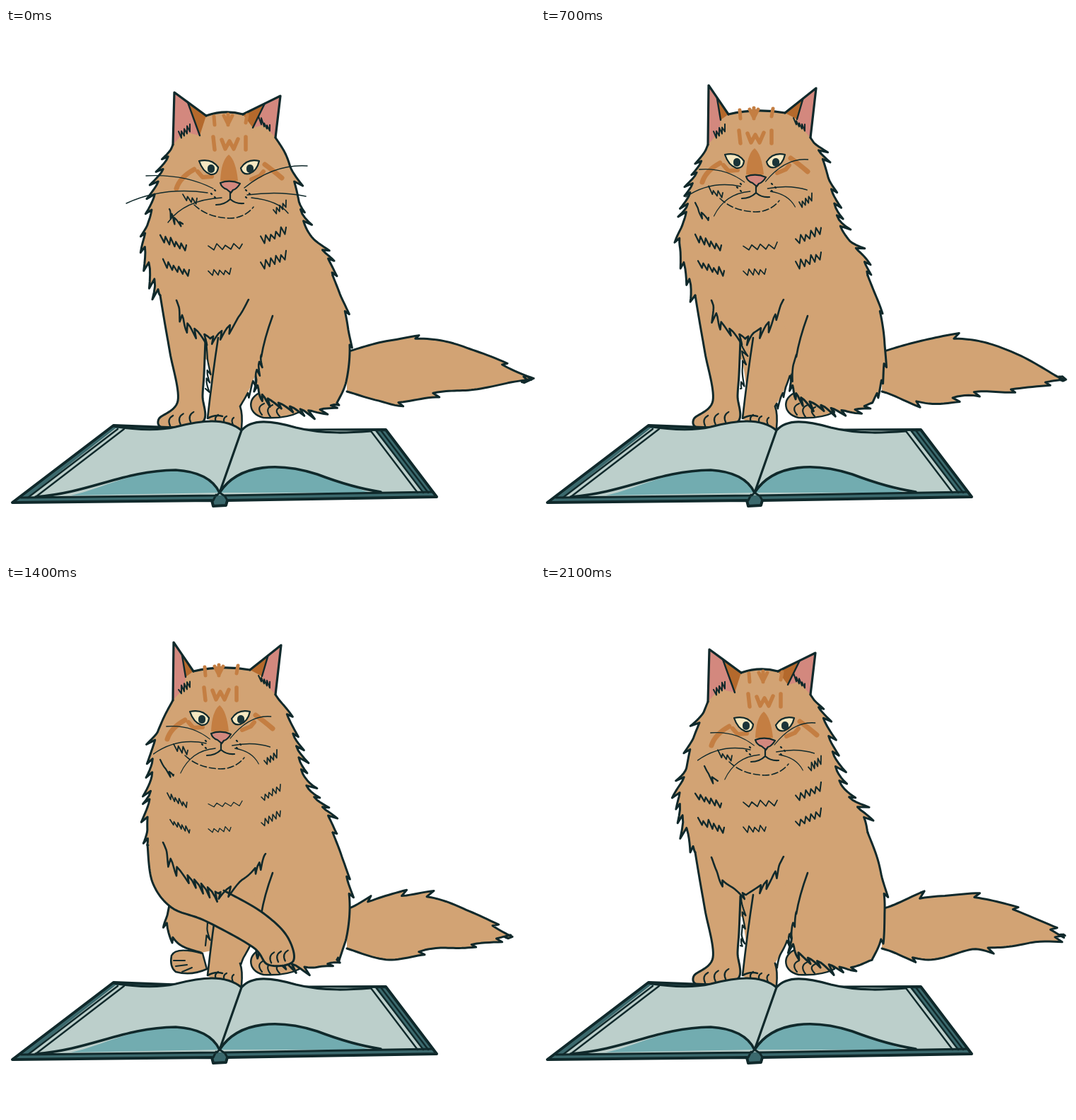
An HTML page with a canvas that plays this animation: 748x748 px, repeating every 2.24 s.

```html
<!DOCTYPE html>
<html lang="en">
<head>
<meta charset="utf-8">
<title>Cat and book</title>
<style>
html, body { margin: 0; width: 100%; height: 100%; overflow: hidden; background: #fff; }
canvas { display: block; width: 100vw; height: 100vh; }
</style>
</head>
<body>
<canvas id="stage" width="748" height="748"></canvas>
<script>
const ctx = document.getElementById('stage').getContext('2d');
const STEP = 140, STEPS = 16;
const INK = '#10292b', FUR = '#d2a374', PINK = '#d3887e', RUST = '#b4692c', STRIPE = '#c47e42';
const PAGE = '#bccfcb', TEAL = '#72acb0', COVER = '#3b696d', CREAM = '#f6e8c2';

// Key shapes, blended by the pose weights.
const TAIL = {
  straight: [[482, 486], [545, 486], [610, 478], [670, 486], [735, 496]],
  down: [[482, 485], [532, 468], [580, 461], [620, 485], [635, 533]],
  up: [[482, 487], [545, 497], [602, 470], [628, 435], [635, 393]]
};
const FLANK = {
  rest: [[236, 165], [226, 190], [213, 224], [205, 262], [196, 307], [218, 378]],
  raised: [[236, 163], [221, 192], [209, 227], [206, 278], [200, 330], [201, 368]]
};
const BACK = {
  rest: [[381, 155], [397, 182], [410, 226], [424, 282], [454, 323], [462, 350]],
  hunched: [[386, 150], [398, 190], [418, 235], [440, 280], [449, 322], [462, 350]]
};
const LEG = {
  rest: [[218, 378], [225, 420], [232, 460], [243, 527], [216, 553], [226, 566], [278, 557], [278, 520], [280, 490], [282, 440]],
  raised: [[200, 368], [207, 420], [234, 456], [282, 475], [349, 512], [371, 537], [406, 532], [397, 496], [361, 462], [308, 432]]
};
const CHEST = {
  rest: [[241, 385], [256, 417], [290, 438], [325, 413], [343, 384]],
  raised: [[222, 364], [243, 400], [300, 436], [342, 411], [367, 380]]
};
// Tip, base and inner fold end of each ear, facing the reader or the book.
const EARS = {
  down: [[[238, 91], [283, 124], [274, 152]], [[388, 96], [335, 122], [349, 141]]],
  ahead: [[[237, 81], [265, 122], [254, 130]], [[389, 85], [345, 120], [362, 129]]]
};

const mix = (a, b, t) => Array.isArray(a) ? a.map((v, i) => mix(v, b[i], t)) : a + (b - a) * t;
const ramp = (x, from, to) => {
  const t = Math.min(1, Math.max(0, (x - from) / (to - from)));
  return t * t * (3 - 2 * t);
};

function poseAt(step) {
  const back = 1 - ramp(step, 12, 15);
  return {
    step,
    curlDown: ramp(step, 0, 2) - ramp(step, 2, 4),
    curlUp: ramp(step, 2, 4) - ramp(step, 4, 5),
    tuck: ramp(step, 7, 8) - ramp(step, 11, 12),
    turn: ramp(step, 3, 5) ** 2 * back,
    lift: ramp(step, 7, 10) * back,
    hunch: ramp(step, 10, 11) - ramp(step, 12, 14),
    perk: step === 14 ? 1 : 0,
    raised: step > 7 && step < 15,
    whiskers: 1 - .35 * ramp(step, 0, 6)
  };
}

// Catmull-Rom curve through the points, sampled.
function curve(pts, n = 14) {
  const out = [];
  for (let i = 0; i < pts.length - 1; i++) {
    const b = pts[i], c = pts[i + 1], a = pts[i - 1] || b, d = pts[i + 2] || c;
    const at = (t, j) => {
      const slope = c[j] - a[j];
      const square = 2 * a[j] - 5 * b[j] + 4 * c[j] - d[j];
      const cube = 3 * (b[j] - c[j]) + d[j] - a[j];
      return b[j] + .5 * t * (slope + t * (square + t * cube));
    };
    for (let k = 0; k < n; k++) out.push([at(k / n, 0), at(k / n, 1)]);
  }
  return [...out, pts[pts.length - 1]];
}

let seed = 1;
const random = () => (seed = seed * 16807 % 2147483647) / 2147483647;

// Curve with tufts pointing along it; the sign of height picks the side.
function fur(pts, size, height, density = .7) {
  const line = curve(pts), out = [line[0]];
  let left = size * random(), length = left, tall = 0;
  for (let i = 1; i < line.length; i++) {
    const [x, y] = line[i], dx = x - line[i - 1][0], dy = y - line[i - 1][1];
    const d = Math.hypot(dx, dy) || 1;
    left -= d;
    const grow = Math.max(0, 1 - left / length) ** 1.6 * tall;
    const lean = Math.abs(grow) * .7;
    out.push([x - dy / d * grow + dx / d * lean, y + dx / d * grow + dy / d * lean]);
    if (left <= 0) {
      if (tall) out.push([x - dx / d * 2, y - dy / d * 2]);
      left = length = size * (.6 + .8 * random());
      tall = random() < density ? height * (.6 + .6 * random()) : 0;
    }
  }
  out[out.length - 1] = line[line.length - 1];
  return out;
}

function shape(p) {
  if (typeof p === 'string') return new Path2D(p);
  const path = new Path2D();
  p.forEach(q => path.lineTo(q[0], q[1]));
  return path;
}
function fill(p, color) { ctx.fillStyle = color; ctx.fill(shape(p)); }
function ink(p, width = 3, color = INK) {
  ctx.lineWidth = width;
  ctx.strokeStyle = color;
  ctx.stroke(shape(p));
}
function both(p, color, width = 3) { fill(p, color); ink(p, width); }

function zigzag(x1, y1, x2, y2, teeth, height, width = 2) {
  const pts = [];
  for (let i = 0; i <= teeth * 2; i++) {
    const t = i / teeth / 2, up = i % 2 ? 0 : height * (.7 + .5 * random());
    pts.push([mix(x1, x2, t) + (i % 2 ? 2 : 0), mix(y1, y2, t) - up]);
  }
  ink(pts, width);
}

function drawTail({ curlDown, curlUp, tuck }) {
  const curl = curlDown + curlUp;
  const spine = TAIL.straight.map((p, i) => p.map((v, j) =>
    v + curlDown * (TAIL.down[i][j] - v) + curlUp * (TAIL.up[i][j] - v) - (j ? 0 : tuck * i * 6.5)));
  const widths = mix([28, 44, 37, 25, 0], [29, 33, 31, 32, 17], curl);
  const side = sign => spine.map(([x, y], i) => {
    const a = spine[Math.max(0, i - 1)], b = spine[Math.min(4, i + 1)];
    const dx = b[0] - a[0], dy = b[1] - a[1], w = sign * widths[i] / Math.hypot(dx, dy);
    return [x - dy * w, y + dx * w];
  });
  const top = fur([...side(-1), spine[4]], 42, -7, .6);
  const bottom = fur([...side(1), spine[4]], 36, 7, .6);
  fill([...top, ...bottom.slice().reverse()], FUR);
  ink(top);
  ink(bottom);
}

function drawHindFeet({ raised }) {
  both('M366 514C340 518 340 546 364 551Q395 553 415 543L400 520Z', FUR, 2.5);
  ink('M362 547Q353 536 365 531M374 550Q365 538 377 533M387 549Q378 540 388 536', 2.2);
  if (!raised) return;
  const haunch = fur([[231, 452], [228, 482], [245, 508], [276, 520]], 16, 5);
  fill([...haunch, [300, 515], [305, 465]], FUR);
  both('M278 521Q240 511 234 524Q231 540 240 547Q262 553 284 543Z', FUR, 2.5);
  ink(haunch);
  ink('M237 531L253 531M240 539L256 537M249 547L263 541', 2);
}

function drawLeg({ lift }) {
  const leg = mix(LEG.rest, LEG.raised, lift), line = curve(leg);
  fill(line, FUR);
  ink(line);
  for (const k of [.12, .4, .68]) {
    const [x, y] = mix(leg[5], leg[6], k);
    ink(`M${x} ${y - 2}q-5 -10 4 -15`, 2.2);
  }
}

function drawBody({ lift, hunch }, ears) {
  const left = fur(mix(FLANK.rest, FLANK.raised, lift), 17, 8, .75);
  const right = fur(mix(BACK.rest, BACK.hunched, hunch), 19, -8, .75);
  const thigh = fur([[462, 350], [478, 395], [486, 450], [481, 500], [468, 530]], 30, -4, .4);
  const belly = fur([[352, 488], [362, 518], [395, 533], [435, 541], [468, 530]], 12, 8, .85);
  const [[tipL, baseL], [tipR, baseR]] = ears;
  fill([...left, [240, 440], [285, 470], [290, 505], [338, 520], ...belly,
    ...thigh.slice().reverse(), ...right.slice().reverse(),
    tipR, baseR, [308, baseL[1] - 5], baseL, tipL], FUR);
  [left, right, thigh, belly].forEach(p => ink(p));
  // Planted front leg
  fill('M300 438Q292 490 284 552L300 562L333 568Q336 546 331 535Q350 505 361 465L340 410Z', FUR);
  ink('M300 438Q292 490 285 552Q296 546 306 549M331 535Q335 546 333 566M377 407Q365 440 361 465', 2.6);
  ink('M298 559Q293 551 300 547M310 562Q305 552 312 549M322 563Q317 554 322 551', 2.2);
  ink(fur([[361, 462], [354, 485], [345, 510], [331, 535]], 14, -5), 2.6);
  ink(fur([[283, 442], [285, 475], [282, 510]], 13, -5), 2.2);
  return [left[0], right[0]];
}

function drawBook(lifted) {
  both('M152 562L9 671L291 668L293 676L311 675L313 668L609 663L537 568L333 569Z', COVER, 4);
  fill('M155 566L30 664L590 657L522 570Z', PAGE);
  fill('M168 567L48 662C120 655 165 626 240 625Q288 628 302 657L333 569C310 550 275 555 240 564Q205 572 168 567Z', PAGE);
  const top = lifted ? 'M333 569C345 532 385 522 416 525C448 530 460 572 516 570'
    : 'M333 569C348 552 375 555 410 565C450 575 490 572 516 570';
  fill(top + 'L582 657L302 657Z', PAGE);
  fill('M92 661C140 650 175 627 240 625Q288 628 302 657Z', TEAL);
  fill('M302 657C330 614 390 615 440 631Q480 646 515 657Z', TEAL);
  ink('M42 663C120 657 165 626 240 625Q288 628 302 657C330 614 390 615 440 631Q490 650 530 656', 3.6);
  ink('M152 563Q205 572 240 564C275 555 310 550 333 569L302 657' + top, 3.2);
  ink('M167 567L42 663M158 567L31 664M516 570L582 657M524 570L590 657M530 569L597 657', 2.4);
  ink('M21 664L298 661L302 657L308 661L602 656M293 668L297 660M313 668L309 661', 3);
}

// Leaf falling onto the left side: upright at 0, nearly flat at 1.
function drawLeaf(fallen) {
  const [x, y] = mix([216, 505], [170, 549], fallen), [u, v] = mix([173, 590], [111, 617], fallen);
  const bend = y - 4, edge = v - 14;
  both(`M333 569C310 ${bend + 18} 270 ${bend} ${x} ${y}L${u} ${v}C${u + 70} ${edge} 285 605 302 657Z`, PAGE, 3.2);
}

function drawEar([tip, base, inner], outer, dir) {
  const fold = mix(tip, base, .42), tuft = [outer[0] + 16 * dir, outer[1] - 18];
  fill([tip, fold, inner, tuft, outer], PINK);
  fill([fold, base, inner], RUST);
  ink([outer, tip, fold, base], 3.2);
  ink([fold, inner], 2.4);
  zigzag(outer[0] + 8 * dir, outer[1] - 8, outer[0] + 24 * dir, outer[1] - 20, 4, 9);
}

function drawFace({ turn, hunch, whiskers }) {
  ctx.save();
  ctx.translate(-13 * turn + 5 * hunch, -9 * turn + hunch);
  ink('M294 125L295 137M308 124L314 136L320 124M314 122L314 137M341 123L339 134', 5, STRIPE);
  ink('M293 154L295 172M305 158L310 171L316 160L322 171L328 157M339 154L339 172', 5.5, STRIPE);
  fill('M315 179Q325 187 328 216L317 219L303 216Q304 188 315 179Z', STRIPE);
  ink('M241 227Q246 211 266 200M366 193Q377 201 390 212', 7, STRIPE);
  ink('M271 203L278 211L291 210M347 214L359 209L364 203', 6, STRIPE);
  both('M273 188Q291 184 300 197Q299 208 289 207Q278 203 273 188Z', CREAM, 2.2);
  both('M358 188Q341 184 332 198Q334 208 344 206Q355 202 358 188Z', CREAM, 2.2);
  for (const x of [290, 345]) ink(`M${x} 198v2`, 10, '#1b3438');
  both('M303 219Q317 214 331 220Q326 228 321 229L318 233L312 228Q305 226 303 219Z', PINK, 2.2);
  ink('M317 232L317 242Q309 250 297 250M317 242Q325 249 336 248', 2.2);
  ctx.setLineDash([9, 4]);
  ink('M266 250Q285 268 316 269Q337 269 350 253', 1.6);
  ctx.setLineDash([]);
  for (const side of [-1, 1])
    for (let i = 0; i < 3; i++) ink(`M${317 + side * (22 + 5 * (i % 2))} ${229 + 5 * i}l1 1`, 2.4);
  zigzag(250, 243, 270, 250, 3, 9, 1.8);
  zigzag(378, 264, 396, 252, 4, 9, 1.8);
  ink(fur([[231, 256], [238, 268], [250, 277]], 8, 5), 2.2);
  ctx.translate(317, 230);
  ctx.scale(whiskers, 1);
  ink('M-24 -3Q-65 -24 -119 -21M-32 3Q-95 -6 -147 18M-12 10Q-65 13 -88 45', 1.4);
  ink('M20 -4Q62 -38 109 -35M24 6Q70 0 107 8M30 10Q68 14 82 32', 1.4);
  ctx.restore();
}

function drawChest({ lift }) {
  const pts = mix(CHEST.rest, CHEST.raised, lift);
  ink(fur(pts.slice(0, 3), 13, 9, .9), 2.6);
  ink(fur(pts.slice(2).reverse(), 13, -8, .8), 2.6);
  const calm = 1 - .25 * lift;
  for (const [y, inset] of [[302, 0], [338, 4]]) {
    const left = 218 + inset + 10 * lift, right = 396 - 8 * lift;
    zigzag(left, y, left + 37 * calm, y + 14, 5, 10 * calm, 2.3 * calm);
    zigzag(286, y + 12, 334 - 4 * inset, y + 10, 4, 8 * calm, 1.7 * calm);
    zigzag(right - 36 * calm, y + 4, right, y - 12, 5, 10 * calm, 2.1 * calm);
  }
}

function posedEars({ turn, hunch, perk }) {
  const ears = mix(EARS.down, EARS.ahead, turn);
  ears.forEach(([tip], i) => {
    tip[0] += (i ? 13 : -13) * hunch;
    tip[1] += 11 * hunch - 12 * perk;
  });
  return ears;
}

function draw(step) {
  const pose = poseAt(step), ears = posedEars(pose);
  seed = 4211 + step * 977;
  ctx.clearRect(0, 0, 748, 748);
  ctx.lineJoin = ctx.lineCap = 'round';
  drawTail(pose);
  drawHindFeet(pose);
  const outer = drawBody(pose, ears);
  if (!pose.raised) drawLeg(pose);
  drawBook(step === 12);
  if (pose.raised) drawLeg(pose);
  if (step === 13 || step === 14) drawLeaf(step - 13);
  drawChest(pose);
  ears.forEach((ear, i) => drawEar(ear, outer[i], i ? -1 : 1));
  const a = ears[0][1], b = ears[1][1];
  ink(`M${a}Q${(a[0] + b[0]) / 2} ${a[1] - 9} ${b}`, 3.2);
  drawFace(pose);
}

let shown = -1;
function tick() {
  const step = Math.floor(performance.now() / STEP) % STEPS;
  if (step !== shown) draw(shown = step);
  requestAnimationFrame(tick);
}
tick();
</script>
</body>
</html>
```
